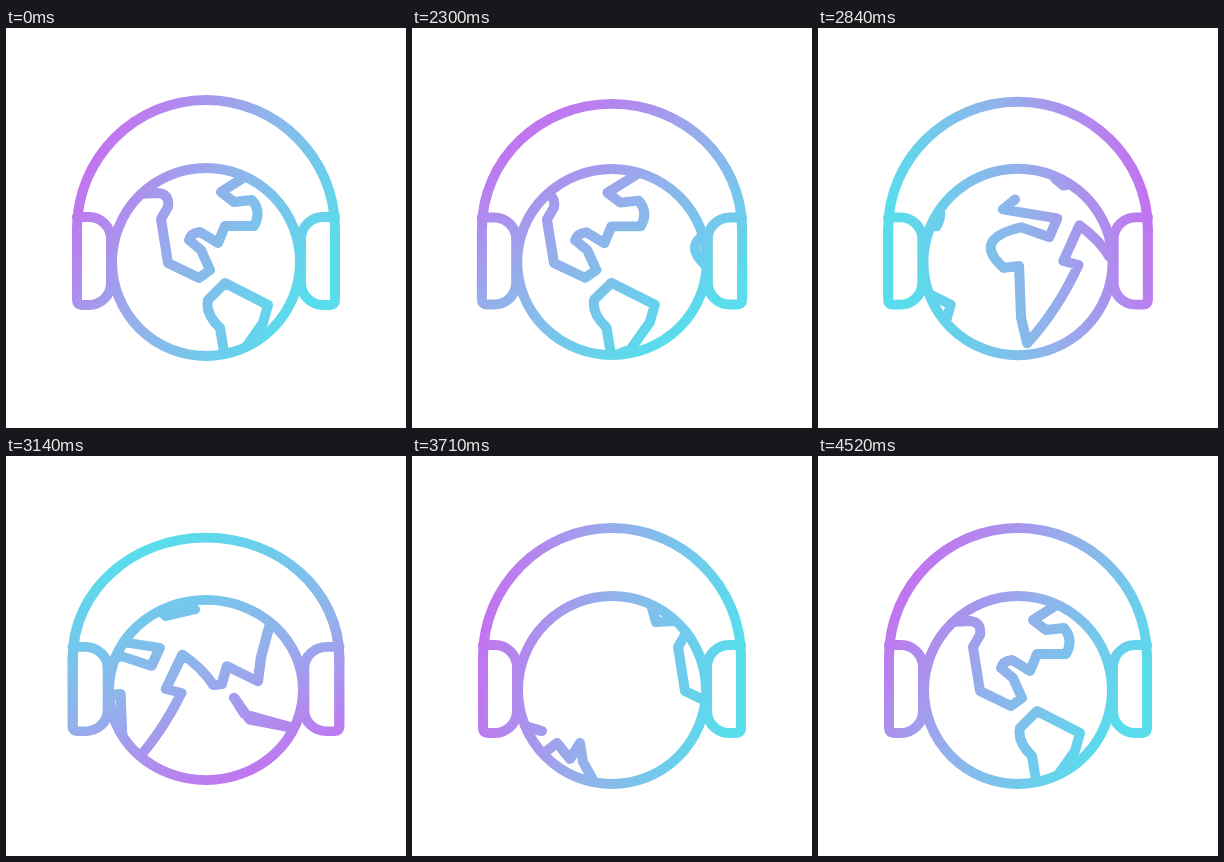
An HTML page with a canvas that plays this animation: 400x400 px, repeating every 4.55 s.

```html
<!DOCTYPE html>
<html>
<head>
<meta charset="utf-8">
<style>
  html, body { margin: 0; width: 100%; height: 100%; overflow: hidden; background: #fff; }
  canvas { display: block; }
</style>
</head>
<body>
<canvas id="stage" width="400" height="400"></canvas>
<script>
const ctx = document.getElementById('stage').getContext('2d');
const LOOP = 4550, STEP = 30, START = 2000, BEATS = 4;
const CX = 200, CY = 234, MAP_WIDTH = 484;

// One turn of the globe, as a flat strip
const land = new Path2D([
  'M129 152L133 166 152 165Q164 166 162 179L155 191 162 235 193 250 204 242 195 222 183 212Q185 205 194 204L212 215 219 198 248 198Q256 184 246 172L228 174 215 164 245 145',
  'M258 138L268 149 277 138',
  'M219 255L262 277 257 295 238 322 219 330 214 300Q199 286 202 272Z',
  'M326 171L314 181 368 190 360 209 332 199Q282 211 315 240L330 238 332 290 338 316Q368 283 389 237L374 233 390 197Q410 212 420 229L428 228 433 209 463 225 466 200 476 160',
  'M366 150L374 157 402 150',
  'M440 242L455 265 503 275 450 259Z',
  'M21 297L34 287 47 303 57 287 60 306 69 322'
].join(''));
const cup = new Path2D('M71 201V272Q71 277 76 277H83A22 22 0 0 0 105 255V211A22 22 0 0 0 83 189H71');
const globe = new Path2D();
globe.arc(CX, CY, 94, 0, 2 * Math.PI);

function ease(t, start, end) {
  const u = Math.min(1, Math.max(0, (t - start) / (end - start)));
  return u * u * (3 - 2 * u);
}

// Beats slow down: beat n falls at 500n + 7.6n³ ms, inverted here
function beatPhase(t) {
  const beat = 9.37 * Math.sinh(Math.asinh(Math.max(0, t - START) / 1561) / 3);
  return beat < BEATS ? beat % 1 : 0;
}

function spinningGradient(t) {
  const angle = Math.PI / 6 + 2 * Math.PI * ease(t, START, 4000);
  const dx = Math.cos(angle), dy = Math.sin(angle);
  const gradient = ctx.createLinearGradient(200 - 143 * dx, 200 - 143 * dy, 200 + 120 * dx, 200 + 120 * dy);
  ['#c66ef0', '#93b1eb', '#59dcec'].forEach((colour, i) => gradient.addColorStop(i / 2, colour));
  return gradient;
}

function drawLand(t) {
  ctx.save();
  ctx.clip(globe);
  ctx.translate(-MAP_WIDTH * ease(t, START, 4480), 0);
  ctx.stroke(land);
  ctx.translate(MAP_WIDTH, 0);
  ctx.stroke(land);
  ctx.restore();
}

function drawHeadphones(top) {
  ctx.stroke(new Path2D(`M71 201C71 130 129 ${top} 200 ${top}S329 130 329 201`));
  ctx.stroke(cup);
  ctx.translate(400, 0);
  ctx.scale(-1, 1);
  ctx.stroke(cup);
}

function draw(t) {
  const phase = beatPhase(t);
  const squash = ease(phase, 0, 0.2) - ease(phase, 0.2, 0.75);
  const scaleY = 1 - 0.055 * squash;
  const bandTop = 72 + 13 * ease(phase, 0, 0.2) - 20 * ease(phase, 0.46, 0.75) + 7 * ease(phase, 0.75, 1);

  ctx.clearRect(0, 0, 400, 400);
  ctx.save();
  ctx.lineWidth = 10;
  ctx.lineCap = ctx.lineJoin = 'round';
  ctx.translate(CX, CY);
  ctx.scale(1 + 0.045 * squash, scaleY);
  ctx.translate(-CX, -CY);
  drawLand(t);
  ctx.stroke(globe);
  drawHeadphones(CY + (bandTop - CY) / scaleY);
  ctx.restore();

  // Tint everything drawn so far
  ctx.save();
  ctx.globalCompositeOperation = 'source-in';
  ctx.fillStyle = spinningGradient(t);
  ctx.fillRect(0, 0, 400, 400);
  ctx.restore();
}

const began = performance.now();
function tick() {
  const t = (performance.now() - began) % LOOP;
  draw(Math.floor((t - 20) / STEP) * STEP + 20);
  requestAnimationFrame(tick);
}
tick();
</script>
</body>
</html>
```
